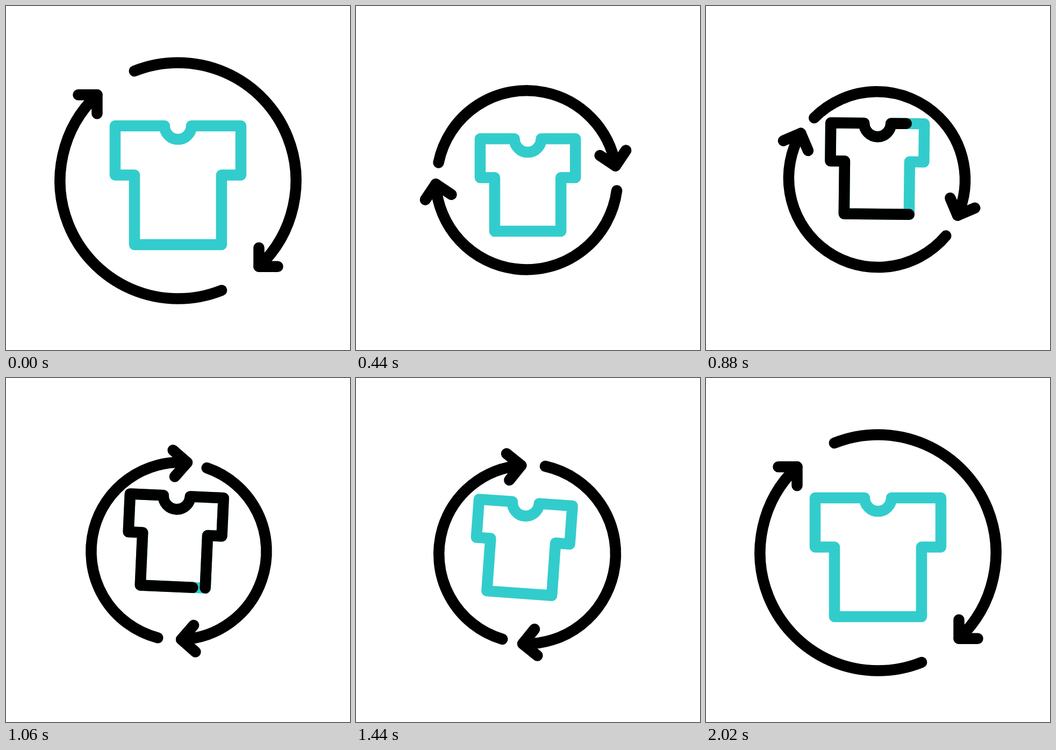
An HTML page with a canvas for the animation above (2.98 s loop, 640 px wide and 640 px high).

```html
<!DOCTYPE html>
<html lang="en">
<head>
<meta charset="utf-8">
<title>Shirt exchange</title>
<style>
html, body { margin: 0; width: 100%; height: 100%; overflow: hidden; background: #fff; }
canvas { display: block; width: 640px; height: 640px; }
</style>
</head>
<body>
<canvas id="stage" width="640" height="640"></canvas>
<script>
const ctx = document.getElementById('stage').getContext('2d');
const LOOP = 2980, STEP = 20;
const TEAL = '#33cccc', BLACK = '#000';
const RAD = Math.PI / 180;
const NECK = 25, BARB = 35;

const mix = (a, b, p) => a + (b - a) * p;

function ease(t, from, to) {
  const p = Math.min(1, Math.max(0, (t - from) / (to - from)));
  return p * p * (3 - 2 * p);
}

// Eased value through [time, value] keys
function track(t, keys) {
  let v = keys[0][1];
  for (let i = 1; i < keys.length; i++) {
    v += (keys[i][1] - keys[i - 1][1]) * ease(t, keys[i - 1][0], keys[i][0]);
  }
  return v;
}

const SPIN = [[208, 0], [467, -58], [650, -58], [1945, 360]];
const RING_SHRINK = [[305, 0], [464, 1], [1390, 1], [1945, 0]];
const SHIRT_SHRINK = [[295, 0], [464, 1], [1430, 1], [1870, 0]];
const LIFT = [[460, 0], [900, -30.5], [920, -30.5], [2020, 0]];
const SWING = [[840, 0], [1000, 4], [1220, -3.8], [1440, 4.1], [1670, -3.9], [2020, 0]];

// Arc shapes: [centre x, centre y, radius, tail angle, tip angle]
const ARCS = [
  { big: [0, 0, 219.5, -111.7, 46.7], small: [-1.2, -2.3, 164, -112.3, 46.9], head: -45 },
  { big: [0, 0, 219.5, 68.3, 226.7], small: [1.8, -4.6, 166, 63.5, 233.2], head: 135 }
];

function drawArc(arc, p) {
  const [x, y, r, tail, tip] = arc.big.map((v, i) => mix(v, arc.small[i], p));
  ctx.beginPath();
  ctx.arc(x, y, r, tail * RAD, tip * RAD);
  ctx.stroke();

  const tx = x + r * Math.cos(tip * RAD), ty = y + r * Math.sin(tip * RAD);
  const barb = side => {
    const a = (arc.head + side * 45) * RAD;
    return [tx + BARB * Math.cos(a), ty + BARB * Math.sin(a)];
  };
  ctx.beginPath();
  ctx.moveTo(...barb(-1));
  ctx.lineTo(tx, ty);
  ctx.lineTo(...barb(1));
  ctx.stroke();
}

function drawRing(t) {
  const p = track(t, RING_SHRINK);
  ctx.save();
  ctx.translate(320, 325);
  ctx.rotate(track(t, SPIN) * RAD);
  ctx.strokeStyle = BLACK;
  ctx.lineWidth = 20.5;
  ARCS.forEach(arc => drawArc(arc, p));
  ctx.restore();
}

// Outline around the neck centre, clockwise from the bottom right corner
function shirt(p) {
  const w = mix(117, 87, p), sleeve = mix(91.5, 71, p);
  const body = mix(81, 60.5, p), hem = mix(221, 169, p);
  const path = new Path2D();
  path.moveTo(body, hem);
  path.lineTo(-body, hem);
  path.lineTo(-body, sleeve);
  path.lineTo(-w, sleeve);
  path.lineTo(-w, 0);
  path.lineTo(-NECK, 0);
  path.arc(0, 0, NECK, Math.PI, 0, true);
  path.lineTo(w, 0);
  path.lineTo(w, sleeve);
  path.lineTo(body, sleeve);
  path.lineTo(body, hem);
  const length = 2 * (body + hem - sleeve + w - body + sleeve + w - NECK) + Math.PI * NECK;
  return { path, length };
}

function drawShirt(t) {
  const p = track(t, SHIRT_SHRINK);
  const { path, length } = shirt(p);
  ctx.save();
  ctx.translate(mix(320, 319.6, p), 180);
  ctx.rotate(track(t, SWING) * RAD);
  ctx.translate(0, mix(43, 68.5, p) + track(t, LIFT));
  ctx.lineWidth = 20.5;
  ctx.strokeStyle = TEAL;
  ctx.stroke(path);

  const start = ease(t, 1020, 1390), end = ease(t, 650, 1020);
  if (end - start > 0.0005) {
    ctx.strokeStyle = BLACK;
    ctx.setLineDash([(end - start) * length, length * 2]);
    ctx.lineDashOffset = -start * length;
    ctx.stroke(path);
  }
  ctx.restore();
}

function draw(now) {
  const t = Math.floor((now % LOOP) / STEP) * STEP;
  ctx.fillStyle = '#fff';
  ctx.fillRect(0, 0, 640, 640);
  ctx.lineCap = ctx.lineJoin = 'round';
  drawRing(t);
  drawShirt(t);
}

function tick() {
  draw(performance.now());
  requestAnimationFrame(tick);
}
tick();
</script>
</body>
</html>
```
